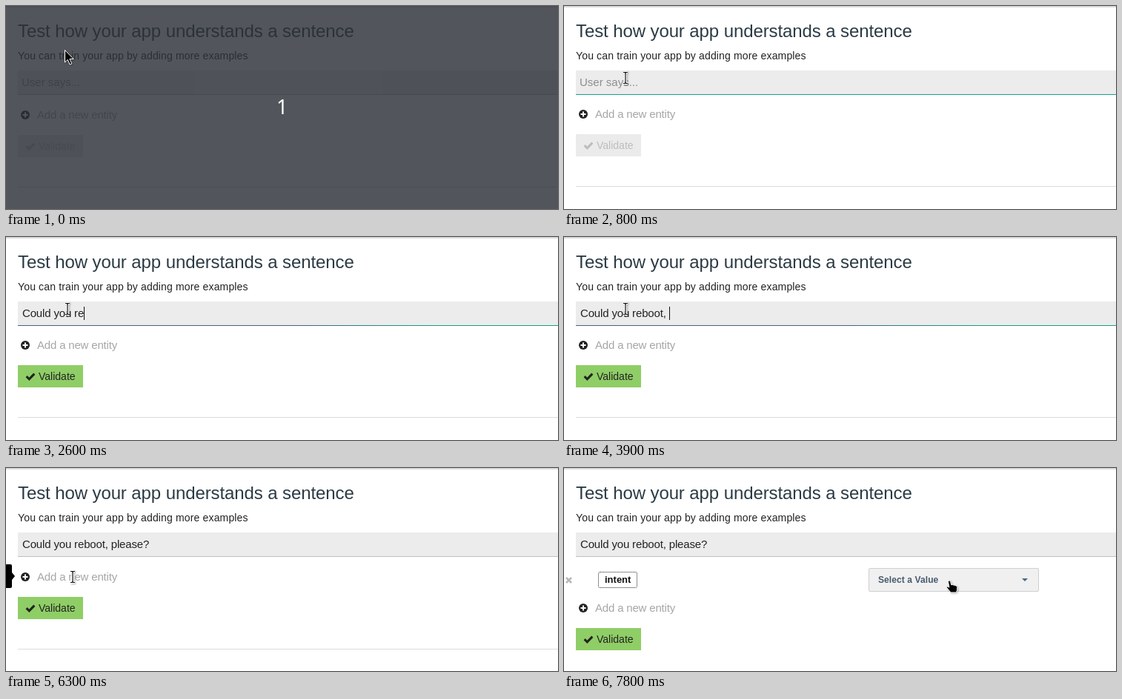
Recreate the animation shown at these times as an HTML page. Size 745x274 px, loop 8000 ms.

```html
<!DOCTYPE html>
<html lang="en">
<head>
<meta charset="utf-8">
<title>Test a sentence</title>
<style>
html, body { margin: 0; width: 100%; height: 100%; overflow: hidden; background: #fff; }
#stage {
  --k: 0;
  position: relative; width: 745px; height: 274px; overflow: hidden; background: #fff;
  font-family: "Liberation Sans", Arial, sans-serif; color: #222;
}
#stage * { position: absolute; margin: 0; box-sizing: border-box; white-space: pre; }
#stage svg { overflow: visible; }
#stage svg * { position: static; }

/* --k tightens the spacing where glyph advances are not rounded to pixels */
.top { left: 0; top: 0; width: 100%; height: 3px; background: linear-gradient(#c4c6c8, #e4e5e6 50%, #fff); }
h1 { left: 16px; top: 20px; font: 24px/27px "Liberation Sans", Arial, sans-serif; color: #2b3b44; letter-spacing: calc(var(--k) * -.1px); }
.sub { left: 16px; top: 59px; font-size: 14px; line-height: 16px; letter-spacing: calc(var(--k) * .15px); }
.field { left: 16px; top: 87px; width: 729px; height: 33px; background: #ececec; font-size: 15px; line-height: 17px; }
.hint { left: 5px; top: 7px; color: #8e8e92; }
.entry { left: 6px; top: 7px; letter-spacing: calc(var(--k) * -.16px); }
#stage #typed { position: static; }
#stage #caret { position: relative; display: inline-block; width: 1px; height: 18px; margin-right: -1px; vertical-align: top; background: #111; }
.line { left: 0; bottom: 0; width: 100%; height: 1px; background: #bfbfbf; }
.glow {
  left: 0; bottom: 0; width: 100%; height: 1px; visibility: hidden;
  background: linear-gradient(90deg, #4a5f80 0 36%, #16a085 50%) 100% 0 / 200% 100%;
  animation: focus 8s step-end infinite, sweep 8s infinite;
}
.below { left: 0; top: 0; width: 745px; height: 274px; animation: shift 8s step-end infinite; }
.plus { left: 20px; top: 141px; }
.add { left: 42px; top: 138px; font-size: 15px; line-height: 17px; color: #a6a6a6; letter-spacing: calc(var(--k) * -.18px); }
.button { left: 16px; top: 174px; width: 88px; height: 30px; background: #ebebeb; color: #bdbdbd; font-size: 14px; line-height: 16px; }
.button span { left: 28px; top: 7px; }
.button svg { left: 10px; top: 9px; }
.filled .button { background: #8fce66; color: #222; }
.filled .hint { visibility: hidden; }
.rule { left: 16px; top: 244px; width: 729px; height: 1px; background: #dcdcdc; }

.tip { left: 0; top: 130px; visibility: hidden; animation: tip 8s step-end infinite; }
.row { left: 0; top: 0; visibility: hidden; animation: row 8s step-end infinite; }
.remove { left: 2px; top: 147px; }
.tag { left: 46px; top: 140px; width: 53px; height: 22px; border: 1px dotted #222; border-radius: 3px; font-size: 13px; font-weight: bold; line-height: 15px; color: #111; }
.tag span { left: 8px; top: 2px; }
.select { left: 411px; top: 135px; width: 230px; height: 32px; border: 1px solid #cfcfcf; border-radius: 2px; background: #f0f0f0; color: #465a6c; font-size: 12px; font-weight: bold; line-height: 14px; }
.select span { left: 12px; top: 8px; letter-spacing: calc(var(--k) * .09px); }
.select svg { left: 206px; top: 13px; }

.pointer { left: 0; top: 0; width: 1px; height: 1px; filter: drop-shadow(1px 1px 1px rgba(0, 0, 0, .3)); animation: move 8s linear infinite; }
.pointer g { visibility: hidden; stroke-linejoin: round; }
.arrow { animation: arrow 8s step-end infinite; }
.beam { animation: beam 8s step-end infinite; }
.hand { animation: hand 8s step-end infinite; }

#veil { inset: 0; background: rgba(44, 48, 56, .82); animation: veil 8s step-end infinite; }
#veil span { left: 365px; top: 117px; font: 27px/37px "Noto Sans", "Open Sans", sans-serif; color: #fff; }

@keyframes veil { 0% { visibility: visible } 1.25%, 100% { visibility: hidden } }
@keyframes focus { 0% { visibility: hidden } 10% { visibility: visible } 70%, 100% { visibility: hidden } }
@keyframes sweep {
  0%, 25% { background-position: 100% 0; animation-timing-function: ease-out }
  37.5% { background-position: 0 0; animation-timing-function: step-end }
  43.75% { background-position: 100% 0; animation-timing-function: ease-out }
  52.5% { background-position: 0 0; animation-timing-function: step-end }
  55%, 100% { background-position: 100% 0 }
}
@keyframes shift {
  0% { transform: none } 10% { transform: translateY(-1px) }
  70% { transform: none } 88.75%, 100% { transform: translateY(42px) }
}
@keyframes tip { 0% { visibility: hidden } 75% { visibility: visible } 80%, 100% { visibility: hidden } }
@keyframes row { 0% { visibility: hidden } 88.75%, 100% { visibility: visible } }
@keyframes move {
  0% { transform: translate(80px, 60px) }
  1.25% { transform: translate(80px, 60px); animation-timing-function: steps(3) }
  5% { transform: translate(83px, 97px) }
  66.25% { transform: translate(83px, 97px); animation-timing-function: steps(8) }
  76.25% { transform: translate(90px, 147px) }
  80% { transform: translate(90px, 147px); animation-timing-function: steps(5) }
  86.25% { transform: translate(80px, 172px) }
  87.5% { transform: translate(80px, 172px); animation-timing-function: steps(6) }
  95% { transform: translate(505px, 166px); animation-timing-function: step-end }
  97.5%, 100% { transform: translate(520px, 152px) }
}
@keyframes arrow {
  0% { visibility: visible } 5% { visibility: hidden }
  71.25% { visibility: visible } 75% { visibility: hidden }
  82.5% { visibility: visible } 92.5%, 100% { visibility: hidden }
}
@keyframes beam {
  0% { visibility: hidden } 5% { visibility: visible }
  71.25% { visibility: hidden } 75% { visibility: visible }
  82.5%, 100% { visibility: hidden }
}
@keyframes hand { 0% { visibility: hidden } 92.5%, 100% { visibility: visible } }
</style>
</head>
<body>
<div id="stage">
  <div class="top"></div>
  <h1>Test how your app understands a sentence</h1>
  <p class="sub">You can train your app by adding more examples</p>

  <div class="field">
    <span class="hint">User says...</span>
    <span class="entry"><span id="typed"></span><i id="caret"></i></span>
    <div class="line"></div>
    <div class="glow"></div>
  </div>

  <div class="below">
    <svg class="plus" width="12" height="12"><circle cx="6" cy="6" r="6" fill="#222"/><path d="M6 2.5v7M2.5 6h7" stroke="#fff" stroke-width="2"/></svg>
    <span class="add">Add a new entity</span>
    <div class="button">
      <svg width="14" height="12"><path d="M1.6 6.2l3.7 3.6 7-7.2" fill="none" stroke="currentColor" stroke-width="3"/></svg>
      <span>Validate</span>
    </div>
    <div class="rule"></div>
  </div>

  <svg class="tip" width="12" height="32"><path d="M0 0h6a2 2 0 0 1 2 2v9l4 5-4 5v9a2 2 0 0 1-2 2h-6z"/></svg>

  <div class="row">
    <svg class="remove" width="9" height="9"><path d="M1 1l7 7M8 1l-7 7" stroke="#b8b8b8" stroke-width="2.6"/></svg>
    <div class="tag"><span>intent</span></div>
    <div class="select"><span>Select a Value</span><svg width="8" height="4"><path d="M0 0h8l-4 4z" fill="#456a88"/></svg></div>
  </div>

  <div id="veil"><span>1</span></div>

  <svg class="pointer">
    <g class="arrow"><path d="M-.5-.5v16.5l3.8-3.6 2.9 6.6 2.6-1.2-2.9-6.3h5.2z" stroke="#fff"/></g>
    <g class="beam" fill="none">
      <path id="bar" d="M-3-7.5h2l1 1 1-1h2M0-6.5v13M-3 7.5h2l1-1 1 1h2" stroke="#fff" stroke-width="3"/>
      <use href="#bar"/>
      <path d="M-3-7.5h2l1 1 1-1h2M0-6.5v13M-3 7.5h2l1-1 1 1h2" stroke="#111" stroke-width="1.2"/>
    </g>
    <g class="hand"><path d="M-1.5 1.5a1.6 1.6 0 0 1 3.2 0l1 4.2 1.6-.2 1.8.6 1.8.2 1.6.9 1.3 1.3-.2 4.2-1.1 3.3h-7.6l-3-3.7-2.6-3.2 1.2-1.2 2.4 1.3z" stroke="#fff"/></g>
  </svg>
</div>

<script>
const $ = s => document.querySelector(s);
const stage = $('#stage'), typed = $('#typed'), caret = $('#caret');
const sentence = 'Could you reboot, please?';
// tenths of a second at which each character is entered
const keys = [12, 13, 14, 15, 16, 16, 19, 21, 22, 23, 24, 25, 27, 28, 29,
  36, 37, 38, 39, 40, 42, 44, 46, 50, 51];
const between = (t, a, b) => t >= a && t < b;

if ($('h1').getBoundingClientRect().width % 1) stage.style.setProperty('--k', 1);

const clock = $('#veil').getAnimations()[0];

function draw() {
  const t = ((clock.currentTime || 0) % 8000 + .01) / 100;
  const text = sentence.slice(0, keys.filter(k => k <= t).length);
  if (typed.textContent !== text) typed.textContent = text;
  stage.classList.toggle('filled', text !== '');
  const on = between(t, 8, 56) && !between(t, 17, 19) && !between(t, 35, 36);
  caret.style.visibility = on ? 'visible' : 'hidden';
  requestAnimationFrame(draw);
}
draw();
</script>
</body>
</html>
```
